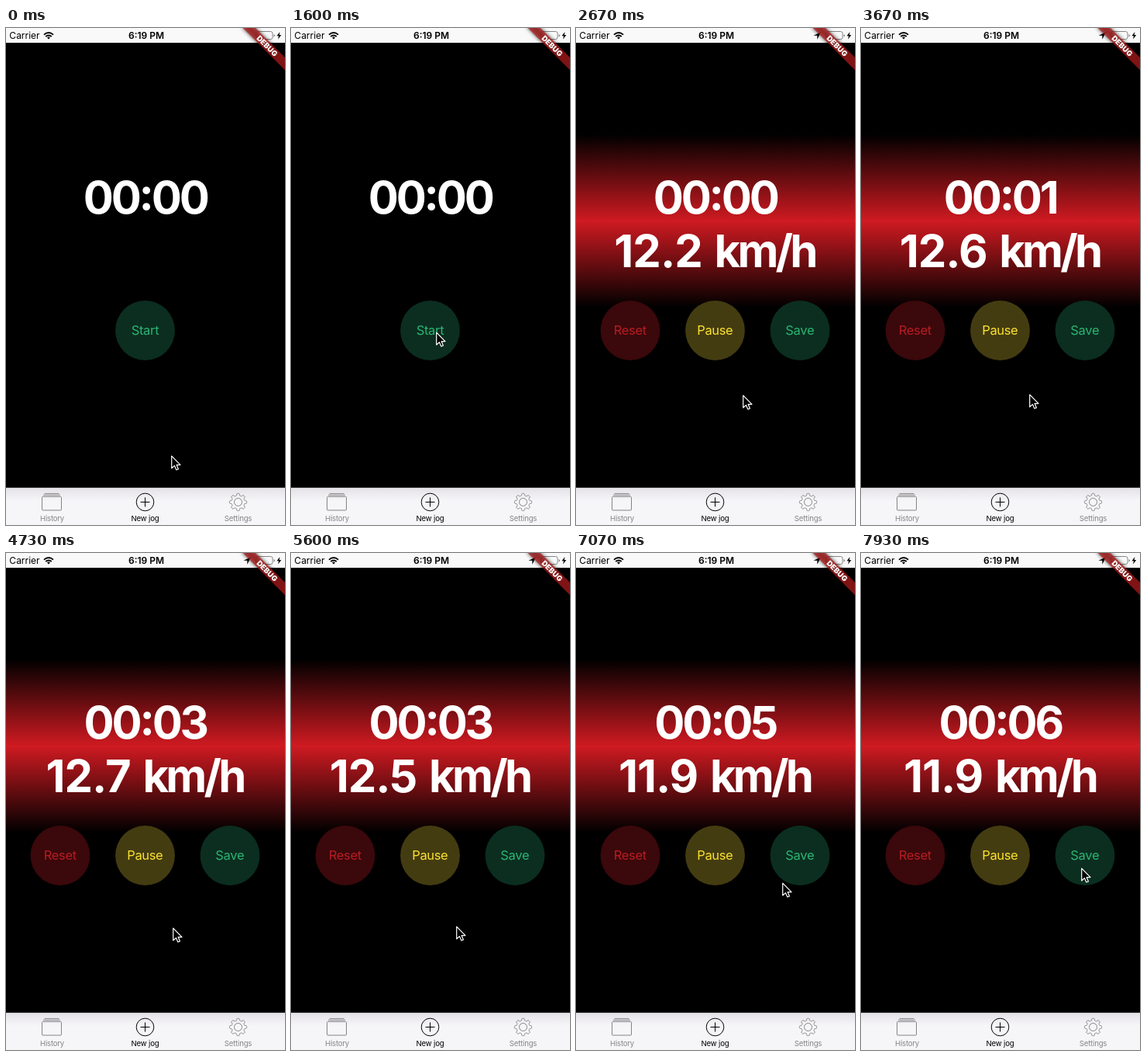
An HTML page for the animation above (8000 ms loop, 360x640 px).

```html
<!DOCTYPE html>
<html lang="en">
<head>
<meta charset="utf-8">
<title>Jog timer</title>
<style>
  html, body { margin: 0; width: 100%; height: 100%; overflow: hidden; background: #000; }
  svg { display: block; width: 360px; height: 640px; }
  text { font-family: Inter, "Open Sans", sans-serif; font-optical-sizing: none; text-anchor: middle; }
  .big { font-size: 58px; font-weight: 700; font-feature-settings: "calt" 0; fill: #fff; }
  .timer { letter-spacing: -.055em; }
  .speed { letter-spacing: -.017em; word-spacing: .05em; }
  .unit { letter-spacing: -.065em; }
  .btn { font-size: 16.5px; letter-spacing: -.02em; }
  .tab { font-size: 9.6px; letter-spacing: -.02em; fill: #858585; }
  .status { font-size: 12px; }
  .line { fill: none; stroke: #858585; }
</style>
</head>
<body>
<svg viewBox="0 0 360 640">
  <defs>
    <linearGradient id="glow" x2="0" y2="1">
      <stop stop-color="#cf1a21" stop-opacity="0"/>
      <stop offset=".5" stop-color="#cf1a21"/>
      <stop offset="1" stop-color="#cf1a21" stop-opacity="0"/>
    </linearGradient>
    <linearGradient id="bar" x2="0" y2="1">
      <stop stop-color="#e4e2e7"/>
      <stop offset=".35" stop-color="#f6f5f8"/>
    </linearGradient>
    <filter id="blur" x="-20%" y="-80%" width="140%" height="260%"><feGaussianBlur stdDeviation="2.6"/></filter>
  </defs>

  <rect width="360" height="640"/>

  <!-- status bar -->
  <rect width="360" height="19" fill="#f9f9f9"/>
  <text class="status" x="24" y="14">Carrier</text>
  <g fill="none" stroke="#000" stroke-width="1.9">
    <path d="M49 8.6Q55 3.4 61 8.6M51.2 11Q55 7.8 58.8 11"/>
    <path d="M53 12.2Q55 10.6 57 12.2L55 14.4Z" fill="#000" stroke="none"/>
  </g>
  <text class="status" x="181" y="14" font-weight="600">6:19 PM</text>
  <rect x="322.5" y="4.5" width="21.5" height="10" rx="2.5" class="line"/>
  <path d="M345.5 8v3.4q1.6-.6 1.6-1.7T345.5 8Z" fill="#858585"/>
  <path d="M353.4 5 349.4 10.3h2.5L351 14.6 355.2 9h-2.6Z"/>

  <!-- running state -->
  <g id="running">
    <path d="M316 5.2 306.4 9.8h4.9v4.9Z"/>
    <rect y="137" width="360" height="223" fill="url(#glow)"/>
    <text class="big speed" x="179" y="308"><tspan id="speed"></tspan> <tspan class="unit">km/h</tspan></text>
    <g class="btn">
      <circle cx="70" cy="389.5" r="38.4" fill="#3b080b"/>
      <text x="69.8" y="395" fill="#b81c22">Reset</text>
      <circle cx="179.5" cy="389.5" r="38.4" fill="#443c11"/>
      <text x="179.3" y="395" fill="#fbe22f">Pause</text>
      <circle cx="289" cy="389.5" r="38.4" fill="#0b2e20"/>
      <text x="288.8" y="395" fill="#2bb573">Save</text>
    </g>
  </g>
  <g id="idle" class="btn">
    <circle cx="179.5" cy="389.5" r="38.4" fill="#0b2e20"/>
    <text x="179.5" y="395" fill="#2bb573">Start</text>
  </g>
  <text class="big timer" x="179.7" y="239">00<tspan dy="-5">:</tspan><tspan dy="5" id="secs">00</tspan></text>

  <!-- tab bar -->
  <rect y="592" width="360" height="48" fill="url(#bar)"/>
  <path d="M0 592.25h360" stroke="#aaa" stroke-width=".5"/>
  <g class="line">
    <rect x="46.5" y="603.5" width="25" height="17.5" rx="1"/>
    <path d="M48 601.5h22M49.5 599.5h19"/>
    <path id="gear"/>
    <circle cx="299.5" cy="610.5" r="5"/>
  </g>
  <g fill="none" stroke="#000">
    <circle cx="179.5" cy="610.5" r="11.3"/>
    <path d="M173.5 610.5h12M179.5 604.5v12"/>
  </g>
  <text class="tab" x="59.5" y="634.5">History</text>
  <text class="tab" x="179.5" y="634.5" style="fill:#000">New jog</text>
  <text class="tab" x="299.5" y="634.5">Settings</text>

  <!-- corner ribbon -->
  <g transform="translate(360 0) rotate(45)">
    <rect x="-40" y="26.9" width="80" height="11.5" fill-opacity=".7" filter="url(#blur)"/>
    <rect x="-39" y="26.9" width="78" height="11.5" fill="#b71c1c" fill-opacity=".7"/>
    <text y="36.1" font-size="9.6" font-weight="900" fill="#fff">DEBUG</text>
  </g>

  <path id="cursor" d="M.7 1.2V17L4.4 13.6 6.8 19 9.4 17.9 7.1 12.6H12Z" stroke="#fff" stroke-width="1.2" stroke-linejoin="round"/>
</svg>
<script>
  const LOOP = 8000, START = 1670, FIRST_TICK = 2730;
  const $ = id => document.getElementById(id);

  // time, x, y of the pointer tip
  const path = [
    [30, 213, 550], [400, 190, 400], [730, 190, 400], [1130, 187, 391],
    [1810, 187, 391], [2330, 215, 472], [3610, 215, 472], [3670, 217, 471],
    [3950, 220, 487], [4270, 217, 483], [4430, 217, 483], [4730, 215, 482],
    [5130, 214, 481], [5329, 214, 481], [5330, 213, 480], [6670, 213, 480],
    [7270, 284, 405]
  ];
  // time, km/h
  const speeds = [[0, 12], [2070, 12.2], [3070, 12.6], [4070, 12.7], [5070, 12.5], [6070, 12.3], [7070, 11.9]];

  const ease = u => u * u * (3 - 2 * u);

  function pointer(t) {
    const i = path.findIndex(k => k[0] > t);
    if (i < 0) return path[path.length - 1].slice(1);
    if (i === 0) return path[0].slice(1);
    const [a, b] = [path[i - 1], path[i]];
    const u = ease((t - a[0]) / (b[0] - a[0]));
    return [1, 2].map(n => Math.round(a[n] + (b[n] - a[n]) * u));
  }

  function gearPath(cx, cy, teeth) {
    const pts = [];
    for (let i = 0; i < 160; i++) {
      const a = i / 160 * 2 * Math.PI;
      const wave = Math.max(-1, Math.min(1, 2 * Math.cos(teeth * a)));
      const r = 9.8 + 1.3 * wave;
      pts.push((cx + r * Math.cos(a)).toFixed(2) + " " + (cy + r * Math.sin(a)).toFixed(2));
    }
    return "M" + pts.join("L") + "Z";
  }

  function draw(now) {
    const t = now % LOOP, on = t >= START;
    const secs = Math.max(0, Math.floor((t - FIRST_TICK) / 1000) + 1);
    $("secs").textContent = String(secs).padStart(2, "0");
    $("speed").textContent = speeds.filter(s => s[0] <= t).pop()[1].toFixed(1);
    $("running").style.display = on ? "" : "none";
    $("idle").style.display = on ? "none" : "";
    $("cursor").setAttribute("transform", `translate(${pointer(t)})`);
    requestAnimationFrame(() => draw(performance.now()));
  }

  $("gear").setAttribute("d", gearPath(299.5, 610.5, 8));
  draw(performance.now());
</script>
</body>
</html>
```
